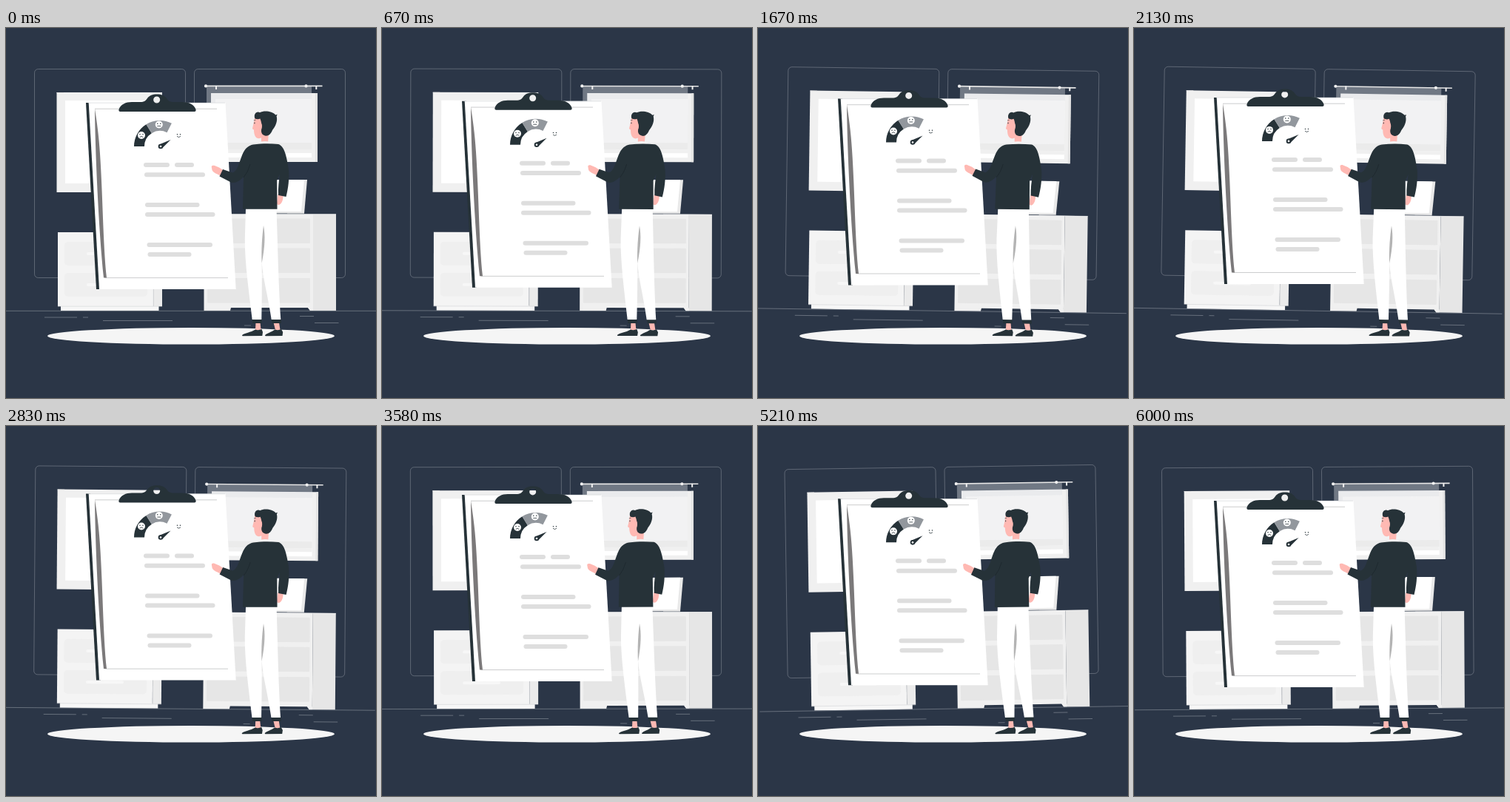
An HTML page with a canvas that plays this animation: 500 by 500 pixels, repeating every 6040 ms.

```html
<!DOCTYPE html>
<html lang="en">
<head>
<meta charset="utf-8">
<title>Clipboard review</title>
<style>
html, body { margin: 0; width: 100%; height: 100%; overflow: hidden; background: #2b3647; }
canvas { display: block; width: 100vw; height: 100vh; }
</style>
</head>
<body>
<canvas id="stage"></canvas>
<script>
const canvas = document.getElementById('stage');
const ctx = canvas.getContext('2d');
const LOOP = 6040, CYCLE = 6000, ROOM_DELAY = 500;
const BG = '#2b3647', DARK = '#263238', SKIN = '#ffb9b3', WHITE = '#ffffff', LINE = '#808893';

function shape(d, color, rule) {
  ctx.fillStyle = color;
  ctx.fill(new Path2D(d), rule || 'nonzero');
}
function stroke(d, color, width) {
  ctx.strokeStyle = color;
  ctx.lineWidth = width;
  ctx.stroke(new Path2D(d));
}
function rect(x1, y1, x2, y2, color, r = 0) {
  ctx.fillStyle = color;
  ctx.beginPath();
  ctx.roundRect(x1, y1, x2 - x1, y2 - y1, r);
  ctx.fill();
}
function oval(x, y, rx, ry, color) {
  ctx.fillStyle = color;
  ctx.beginPath();
  ctx.ellipse(x, y, rx, ry, 0, 0, Math.PI * 2);
  ctx.fill();
}
function moved(dx, dy, draw) {
  ctx.save();
  ctx.translate(dx, dy);
  draw();
  ctx.restore();
}
function turned(deg, x, y, draw) {
  ctx.save();
  ctx.translate(x, y);
  ctx.rotate(deg * Math.PI / 180);
  ctx.translate(-x, -y);
  draw();
  ctx.restore();
}

// 0 -> 1 -> -1 -> 0 in straight segments
function sway(ms) {
  const p = (ms % CYCLE) / CYCLE;
  if (p < 0.25) return p * 4;
  if (p < 0.75) return 2 - p * 4;
  return p * 4 - 4;
}
// 0 -> 1 -> 0
function lift(ms) {
  const p = (ms % CYCLE) / CYCLE;
  return 1 - Math.abs(1 - 2 * p);
}

function wallFrames() {
  ctx.strokeStyle = LINE;
  ctx.lineWidth = 0.6;
  for (const x of [38.5, 254.5]) {
    ctx.beginPath();
    ctx.roundRect(x, 55.5, 204, 282, 5);
    ctx.stroke();
  }
}

function leftWindow() {
  rect(68.5, 87, 211, 222, '#f0f0f0');
  rect(68.5, 87, 78, 88, '#e6e6e6');
  rect(80, 98, 200, 210, WHITE);
}

function rightWindow() {
  rect(277, 88, 421, 181, '#f0f0f0');
  rect(418, 88, 421, 181, '#e4e4e4');
  rect(283, 96, 413, 175, WHITE);
  rect(271, 79, 413, 164, 'rgba(224,226,230,0.38)');
  rect(283, 96, 413, 155, 'rgba(240,240,240,0.45)');
  rect(283, 155, 413, 164, '#ebebeb');
  rect(283, 164, 413, 169, '#f0f0f0');
  rect(269, 77.6, 427.5, 79.2, '#e6e6e6');
  oval(270, 78.4, 2.1, 2.1, '#f0f0f0');
  oval(405.5, 78.4, 2.1, 2.1, '#f0f0f0');
  rect(283, 78, 285, 83, '#f0f0f0');
  rect(418.3, 78, 420.3, 83, '#f0f0f0');
}

function leftCabinet() {
  rect(74, 375, 206.5, 382, '#f7f7f7');
  rect(199, 276, 211, 376, '#ebebeb');
  rect(70, 276, 199, 376, '#f4f4f4');
  stroke('M199.3 276V376', '#aeb2b8', 0.5);
  stroke('M70 376.2H211', '#d0d2d5', 0.6);
  for (const y of [289, 331]) {
    rect(79, y, 191, y + 32, '#efefef', 5);
    rect(109, y + 14, 160, y + 18, '#f7f7f7', 2);
  }
}

function rightCabinet() {
  shape('M415 251.5H446V382H411L408 378H415Z', '#e6e6e6');
  shape('M267.5 251.5H415V382H411L408 378H304L303 382H267.5Z', '#f0f0f0');
  for (const y of [257.5, 297.5, 338]) rect(272, y, 411, y + 33.5, '#e6e6e6', 1);
  stroke('M267.5 251.8H446', '#f7f7f7', 0.7);
  shape('M361 205H407L403 250.5H357Z', '#e9e9e9');
  shape('M361 205H403L399 248H357Z', WHITE);
  stroke('M380 250.8H403', '#c7c9cc', 0.8);
}

function floor() {
  stroke('M0 382.3H500', LINE, 0.7);
  stroke('M52 391H96M104 391H111M131 395.5H225M397 389.5H416M417 398.5H449.5M322 402H331', LINE, 0.7);
}

function room() {
  wallFrames();
  leftWindow();
  rightWindow();
  leftCabinet();
  rightCabinet();
  floor();
}

function ringPart(from, to, color) {
  const rad = Math.PI / 180;
  ctx.fillStyle = color;
  ctx.beginPath();
  ctx.arc(208, 160, 35, from * rad, to * rad);
  ctx.arc(208, 160, 21, to * rad, from * rad, true);
  ctx.fill();
}

// bend > 0 smiles, bend < 0 frowns
function face(x, y, bend) {
  oval(x, y, 5, 5, WHITE);
  oval(x - 2, y - 1.3, 0.75, 0.75, DARK);
  oval(x + 2, y - 1.3, 0.75, 0.75, DARK);
  const m = y + 2 - bend / 2;
  stroke(`M${x - 2.4} ${m}Q${x} ${m + bend * 2} ${x + 2.4} ${m}`, DARK, 0.8);
}

function gauge() {
  ringPart(180, 238, DARK);
  ringPart(238, 297, '#92979d');
  face(183, 145, -1.3);
  face(206.8, 130.5, 0);
  face(233.5, 145, 1.3);
  shape('M207 157.5L222.5 151L211 162.5Z', DARK);
  oval(209, 160, 3.3, 3.3, DARK);
  oval(209, 160, 1.3, 1.3, WHITE);
}

function clipboard() {
  shape('M108 101H114L128 353H122Z', DARK);
  shape('M111.7 101H296.5L310.7 353H126Z', WHITE);
  stroke('M111 101.2H296', '#c4c7ca', 0.5);
  stroke('M120 109.3H285M134 337.6H300', '#a9abad', 0.6);
  shape('M120 109C120.5 165 125 270 132 337.5H136C131 290 131 230 127 170C125.5 145 122.5 125 120 109Z', '#7b797a');

  const bars = [
    [186, 185, 221], [228, 185, 254], [187, 198.3, 269],
    [188, 239, 261.5], [188, 252, 282.5],
    [190.5, 293, 279], [191.5, 306, 250.5]
  ];
  for (const [x1, y, x2] of bars) rect(x1, y - 3, x2, y + 3, '#dedede', 3);

  gauge();

  // the hole stays open so the wall shows through
  shape('M154.5 113Q151.8 113 152.5 110C155 103 162 100 170 100H181C187 100 189 98 191 95' +
        'C194 91.3 198 89.6 204 89.6C210 89.6 214 91.3 217 95C219 98 221 100 227 100H238' +
        'C247 100 254 103 256.5 110Q257.2 113 254.5 113Z' +
        'M208.2 97a4.5 4.5 0 1 0 -9 0a4.5 4.5 0 1 0 9 0Z', DARK, 'evenodd');
}

function legs() {
  shape('M337.5 398H343.5L344.5 408H337Z', SKIN);
  shape('M361.5 398H369L370.5 408H364Z', SKIN);
  shape('M319 415.2C322 412 331 411.5 337 407.5Q341 409 345.5 407L347 411L346.3 416L320 416.2Q319 416 319 415.2Z', DARK);
  shape('M350 415.2C353 412 358 411.5 363.5 407.5Q368 409 372 407L374.2 411L373.5 416L351 416.2Q350 416 350 415.2Z', DARK);
  shape('M332.7 393H345.7V399H333.5Z', DARK);
  shape('M358.5 393H371.5L372 399H360Z', DARK);
  shape('M324 244H365.5C367 285 368 340 371.3 394H358.7C354 362 347 338 345.6 316' +
        'C346 340 345.8 370 345.3 394H332.7C328 355 322.5 315 322.8 285Z', WHITE);
  shape('M348 267C350.5 280 350 295 345.6 318C344.8 300 346 282 348 267Z', '#b4b4b4');
}

function body() {
  shape('M278 189C277 186 279 185 282 186L288 188.5L294 192.5L290 200C286 197 280 196 278.5 192Z', SKIN);
  shape('M367.5 225L374.5 227C374.5 233 372 239 368 239Q366 239 366 236Z', SKIN);
  shape('M345 140H355L354 155H345Z', SKIN);
  oval(350, 155.3, 8, 2.4, '#f4f4f4');
  shape('M334 157.5C346 156 357 156 368 157C376 159.5 379 172 382 191C383 204 381.5 216 378.5 228L368 226' +
        'C367.5 216 369 206 370 197L366.2 206L366.5 244.8H320L321 201C316 207 309 210.5 304 208.5' +
        'L288.5 200.5L293 191L306 195.5C310 194.5 313 189 315 183C319 173 321 160 334 157.5Z', DARK);
  stroke('M330 184Q327 195 321 202', '#1c262b', 0.7);
}

function head() {
  shape('M336 121C335 126 334.6 130 333 135.5Q333 137.2 335 137.5C335 143 336.5 149.5 342 149.3L349 147L351 122Z', SKIN);
  shape('M336.5 122.5C334 117 338.5 111.8 343 114.2C349 111 360 112.5 364.2 117.4L366.6 116.8L365.6 119.2' +
        'C367.5 126 364 133 360 138C358 143 355 146 351 145.7C346 145 344 141 345.4 136' +
        'C346 131 344.8 126 343.4 122.6Q340 124 336.5 122.5Z', DARK);
  oval(343.6, 132.6, 2.3, 4.2, SKIN);
  oval(335.9, 128.4, 0.6, 0.9, DARK);
  stroke('M334.8 124.8L337.5 124.3', DARK, 0.6);
}

function person() {
  legs();
  body();
  head();
}

function draw(now) {
  const t = now % LOOP;
  const w = Math.round(innerWidth * devicePixelRatio);
  const h = Math.round(innerHeight * devicePixelRatio);
  if (canvas.width !== w || canvas.height !== h) {
    canvas.width = w;
    canvas.height = h;
  }
  ctx.setTransform(w / 500, 0, 0, h / 500, 0, 0);
  ctx.fillStyle = BG;
  ctx.fillRect(0, 0, 500, 500);

  turned(sway(Math.max(0, t - ROOM_DELAY)), 250, 228, room);
  oval(250, 416.3, 194, 11.3, '#f5f5f5');
  moved(0, -10 * lift(t), clipboard);
  turned(sway(t), 330, 264, person);
}

const start = performance.now();
function tick() {
  draw(performance.now() - start);
  requestAnimationFrame(tick);
}
tick();
</script>
</body>
</html>
```
